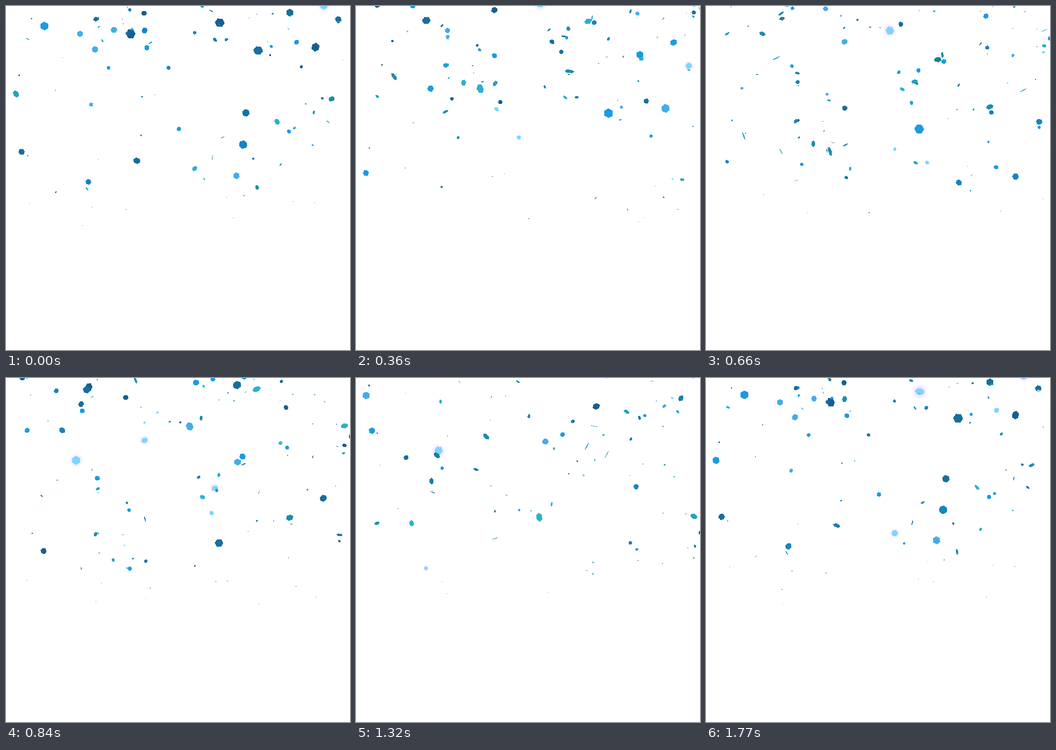
An HTML page that plays this animation: 618 by 618 pixels, repeating every 1.8 s.

```html
<!DOCTYPE html>
<html lang="en">
<head>
<meta charset="utf-8">
<title>Falling confetti</title>
<style>
  html, body { margin: 0; width: 100%; height: 100%; overflow: hidden; background: #fff; }
  svg { display: block; width: 100%; height: 100%; }
</style>
</head>
<body>
<svg viewBox="0 0 618 618" xmlns="http://www.w3.org/2000/svg">
  <defs>
    <radialGradient id="glow">
      <stop offset="0" stop-color="#8fe4ff" stop-opacity=".75"/>
      <stop offset=".5" stop-color="#d9b8ff" stop-opacity=".38"/>
      <stop offset="1" stop-color="#ffc4f4" stop-opacity="0"/>
    </radialGradient>
  </defs>
  <g id="glows" fill="url(#glow)"></g>
  <g id="pieces" shape-rendering="crispEdges"></g>
</svg>
<script>
const STEP = 30, CYCLE = 60;        // milliseconds per step, steps per loop
const GRAVITY = 0.14, TOP = -26;    // fall from rest above the stage
const FACE = ['#1a9be3', '#176f9f', '#1a9be3', '#1683c2', '#45acea', '#155f92'];
const TILTED = ['#22a2c1', '#1f8cab', '#2bb0d0', '#1d7d9f'];
const EDGE = ['#1f8fb8', '#1b78a8', '#2a9fd0', '#2396b5'];

// x, y, radius of the larger pieces at the start of the loop
const opening = [
  69,36,8, 384,30,9, 453,80,9, 28,262,6, 487,208,6, 235,278,7, 431,192,7,
  224,50,9, 148,316,8, 253,75,5, 597,24,6, 510,12,7, 451,326,8, 133,50,6,
  249,44,6, 292,111,4, 160,78,6, 153,177,4, 194,43,6, 556,74,8, 18,158,7,
  522,65,5, 585,167,6, 426,249,8, 248,13,5, 414,305,8, 339,292,6
];
// and of those that enter later, at step 28
const entering = [
  126,148,8, 608,86,7, 330,87,8, 425,141,6, 416,151,7, 375,198,6, 101,94,6,
  135,47,6, 215,35,5, 570,216,7, 165,199,4, 164,180,5, 145,21,7, 137,59,5,
  38,94,5, 493,117,4, 503,53,5, 249,112,6, 353,214,5, 505,125,4, 608,121,4
];

let seed = 20117;
const random = () => (seed = (seed * 16807) % 2147483647) / 2147483647;
const between = (a, b) => a + (b - a) * random();
const mod = (n, m) => ((n % m) + m) % m;
const pick = (list, n) => list[mod(n, list.length)];

function addShape(tag, parent) {
  const node = document.createElementNS('http://www.w3.org/2000/svg', tag);
  return document.getElementById(parent).appendChild(node);
}

function makePiece(x, age, step, radius, tilt) {
  return {
    x, age, step, radius, tilt,
    drift: between(-0.08, 0.08),
    spin: between(0.2, 0.48) * (random() < 0.5 ? -1 : 1),
    axis: between(0, Math.PI),
    turn: between(-0.05, 0.05),
    roll: between(0, Math.PI / 3),
    tone: Math.floor(between(0, 12)),
    shape: addShape('path', 'pieces'),
    glow: radius > 5 ? addShape('circle', 'glows') : null
  };
}

const pieces = [];
function place(list, step) {
  for (let i = 0; i < list.length; i += 3) {
    const age = Math.sqrt((list[i + 1] - TOP) / GRAVITY);
    pieces.push(makePiece(list[i], age, step, list[i + 2], between(0, 0.9)));
  }
}
place(opening, 0);
place(entering, 28);
for (let i = 0; i < 88; i++) {
  const radius = 1 + 4 * Math.pow(random(), 1.5);
  pieces.push(makePiece(between(0, 618), between(0, CYCLE), 0, radius, between(0, Math.PI)));
}

function hexagon(cx, cy, radius, axis, squash, roll) {
  const ax = Math.cos(axis), ay = Math.sin(axis);
  let path = '';
  for (let k = 0; k < 6; k++) {
    const a = roll + k * Math.PI / 3;
    const u = radius * squash * Math.cos(a), v = radius * Math.sin(a);
    const px = cx + u * ax - v * ay, py = cy + u * ay + v * ax;
    path += (k ? 'L' : 'M') + px.toFixed(2) + ' ' + py.toFixed(2);
  }
  return path + 'Z';
}

function drawPiece(p, step) {
  const age = mod(p.age + step - p.step, CYCLE);
  const since = age - p.age;
  const x = p.x + p.drift * since;
  const y = GRAVITY * age * age + TOP;
  const shrink = Math.pow(Math.min(1, Math.max(0, (57.5 - age) / 10.5)), 1.5);
  const radius = p.radius * shrink;
  const angle = p.tilt + p.spin * since;
  const facing = Math.abs(Math.cos(angle));
  const squash = Math.max(facing, Math.min(1, 0.5 / Math.max(radius, 0.5)));
  const shade = p.tone + Math.floor(angle / Math.PI + 0.5);
  const glint = facing > 0.4 && Math.sin(angle * 1.7 + p.tone * 2.3) > 0.975;
  const colours = facing > 0.8 ? FACE : facing > 0.35 ? TILTED : EDGE;

  p.shape.setAttribute('d', radius > 0.3
    ? hexagon(x, y, radius, p.axis + p.turn * since, squash, p.roll) : '');
  p.shape.setAttribute('fill', glint ? '#7ad6ff' : pick(colours, shade));
  if (p.glow) {
    p.glow.setAttribute('cx', x);
    p.glow.setAttribute('cy', y);
    p.glow.setAttribute('r', glint ? radius * 1.7 : 0);
  }
}

const start = performance.now();
let shown = -1;
function tick() {
  const step = Math.floor((performance.now() - start) / STEP) % CYCLE;
  if (step !== shown) {
    shown = step;
    pieces.forEach(p => drawPiece(p, step));
  }
  requestAnimationFrame(tick);
}
tick();
</script>
</body>
</html>
```
